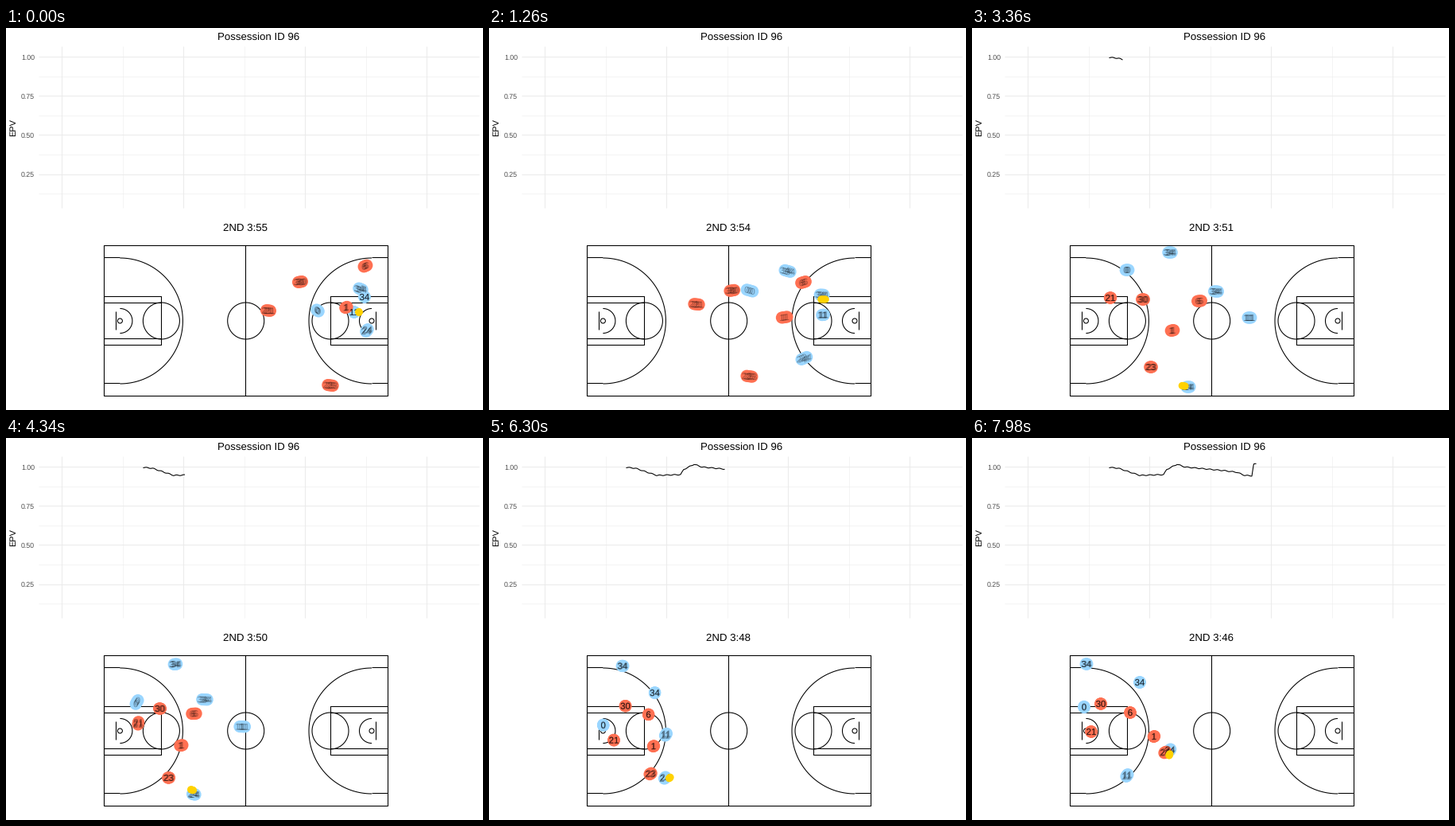
Animation of 600 by 480 pixels, one loop 8 s. Source, as a matplotlib script:

```python
import numpy as np
import matplotlib.pyplot as plt
from matplotlib.animation import FuncAnimation
from matplotlib.collections import LineCollection, PathCollection
from matplotlib.path import Path
from matplotlib.textpath import TextPath
from matplotlib.transforms import Affine2D

plt.rcParams["font.family"] = "Liberation Sans"
plt.rcParams["text.hinting"] = "none"

LOOP, TICK, STEP = 8000, 20, 140      # ms
PT = 0.72                             # points per pixel at 100 dpi
TRAIL = np.array([-1.5, -0.5, 0.5, 1.5]) / 4
BLUE, RED, GOLD = "#9ad6ff", "#ff7052", "#ffd200"

# Number, opening pace, then places at the four key steps:
# rebound, fast break, set up, end
KEYS = np.array([0, 24, 39, 57])
OFFENSE = [
    ("34", 0.7, (446, 328), (249, 282), (183, 287), (144, 284)),
    ("34", 0.0, (451, 338), (307, 331), (208, 325), (211, 307)),
    ("0", 0.4, (392, 355), (195, 304), (146, 366), (141, 338)),
    ("11", 0.0, (438, 357), (349, 364), (241, 361), (195, 424)),
    ("24", 0.4, (454, 380), (272, 451), (215, 439), (249, 392)),
]
DEFENSE = [
    ("1", 0.4, (428, 351), (252, 380), (202, 390), (229, 375)),
    ("6", 0.7, (452, 299), (286, 343), (202, 348), (199, 345)),
    ("21", 1.0, (330, 355), (174, 339), (161, 382), (150, 369)),
    ("30", 1.0, (370, 319), (215, 341), (178, 338), (162, 334)),
    ("23", 1.1, (408, 449), (225, 426), (194, 428), (243, 395)),
]
PLAYERS = OFFENSE + DEFENSE

EPV = np.array([(173, 37), (184, 38), (211, 47), (241, 46), (245, 39.5),
                (258, 33), (268, 36.5), (317, 41), (333, 43), (343, 47),
                (352, 47.5), (354.3, 33), (358, 32.5)])


def smooth(t, start, end):
    s = np.clip((t - start) / (end - start), 0, 1)
    return s * s * (3 - 2 * s)


def track(pace, pts, t):
    """Hermite path that slows where the direction turns."""
    p, h = np.array(pts, float), np.diff(KEYS)[:, None]
    d = np.diff(p, axis=0) / h
    a, b = d[:-1], d[1:]
    mid = np.where(a * b > 0, 2 * a * b / np.where(a * b > 0, a + b, 1), 0)
    v = np.vstack([d[:1] * (pace, 1.2), mid, d[-1:]])
    i = np.clip(np.searchsorted(KEYS, t, "right") - 1, 0, len(KEYS) - 2)
    w, s = h[i], ((t - KEYS[i]) / h[i, 0])[..., None]
    return ((1 + 2 * s) * (1 - s) ** 2 * p[i] + s * (1 - s) ** 2 * w * v[i]
            + s * s * (3 - 2 * s) * p[i + 1] + s * s * (s - 1) * w * v[i + 1])


def carry(t, first, second, third):
    """The ball circles its holder and is passed on twice."""
    one, two = (smooth(t, *span)[..., None] for span in ((2, 8), (11, 14)))
    holder = first + (second - first) * one
    holder = holder + (third - holder) * two
    turn = np.radians(8 * t)
    return holder + 6 * np.stack([np.cos(turn), np.sin(turn)], axis=-1)


def arc(x, y, r, a0=0, a1=360):
    a = np.radians(np.linspace(a0, a1, 121))
    return np.column_stack([x + r * np.cos(a), y + r * np.sin(a)])


def box(x0, y0, x1, y1):
    return [(x0, y0), (x1, y0), (x1, y1), (x0, y1), (x0, y0)]


def number(s):
    path = TextPath((0, 0), s, size=11.4, prop={"family": "Liberation Sans"})
    b = path.get_extents()
    return path.transformed(
        Affine2D().translate(-(b.x0 + b.x1) / 2, -(b.y0 + b.y1) / 2))


fig = plt.figure(figsize=(6, 4.8), dpi=100, facecolor="white")
ax = fig.add_axes([0, 0, 1, 1])
ax.set(xlim=(0, 600), ylim=(480, 0))
ax.axis("off")


def lines(segs, color, width, z):
    ax.add_collection(LineCollection(segs, colors=color, linewidths=width * PT,
                                     zorder=z, capstyle="butt"), autolim=False)


def label(x, y, s, size, color="black", **kw):
    kw = {"ha": "center", "va": "baseline", **kw}
    return ax.text(x, y, s, fontsize=size * PT, color=color, **kw)


def marks(paths, color, z, alpha=None):
    c = PathCollection(paths, offsets=np.zeros((len(paths), 2)),
                       offset_transform=ax.transData, facecolors=color,
                       edgecolors="none", linewidths=0, alpha=alpha, zorder=z)
    c.set_transform(Affine2D())
    ax.add_collection(c, autolim=False)
    return c


# Chart panel
def grid(xs, ys, width):
    lines([[(x, 23), (x, 226)] for x in xs]
          + [[(41, y), (595, y)] for y in ys], "#ebebeb", width, 1)


n = np.arange(4)
cols, rows = 70.3 + 152.9 * n, 36.2 + 49.1 * n
grid(cols[:3] + 76.4, rows + 24.5, 0.55)
grid(cols, rows, 1.07)
for y, value in zip(rows, 1 - n / 4):
    label(36, y + 0.4, f"{value:.2f}", 8.8, "#4d4d4d", ha="right",
          va="center_baseline")
label(9.5, 125, "EPV", 11, rotation=90, va="center")
label(317.6, 15, "Possession ID 96", 13.2)
clock = label(300.8, 255, "", 13.2)
curve, = ax.plot([], [], color="black", lw=1.07 * PT, zorder=2)

# Court, mirrored about the half-way line
hoop = 143.4, 368
half = [
    box(123, 337, 195, 398),
    [(123, 345), (195, 345)],
    [(123, 390), (195, 390)],
    [(138, 356), (138, 379)],
    [(123, 288), (143, 288)],
    [(123, 446), (143, 446)],
    arc(*hoop, 79, -90, 90),
    arc(*hoop, 15.5, -90, 90),
    arc(*hoop, 3),
    arc(195.4, 368, 23),
]
flip = [[(603.4 - x, y) for x, y in seg] for seg in half]
lines(half + flip + [box(123, 273, 480, 462), [(301, 273), (301, 462)],
                     arc(301.7, 368, 23)], "black", 1.07, 3)

# Players and ball, each drawn once per trail sample
copies = len(TRAIL)
colors = [BLUE] * (copies * len(OFFENSE)) + [RED] * (copies * len(DEFENSE))
glyphs = [g for s, *_ in PLAYERS for g in [number(s)] * copies]
dots = marks([Path.circle((0, 0), 7.6)] * len(colors), colors, 4)
digits = marks(glyphs, "black", 5, 0.33)
ball = marks([Path.circle((0, 0), 4.6)] * copies, GOLD, 6)

times = np.arange(-(-LOOP // STEP))[:, None] + TRAIL
paths = [track(pace, pts, times) for _, pace, *pts in PLAYERS]
crowd = np.concatenate(paths, axis=1)
ball_xy = carry(times, paths[3], paths[1], paths[4])


def update(i):
    k = i * TICK // STEP
    dots.set_offsets(crowd[k])
    digits.set_offsets(crowd[k])
    ball.set_offsets(ball_xy[k])
    clock.set_text(f"2ND 3:{int(55.5 - 0.16 * k)}")
    x = np.arange(EPV[0, 0], 66.5 + 5.105 * k, 0.5)
    curve.set_data(x, np.interp(x, *EPV.T) + 0.5 * np.sin(x / 1.5))
    return dots, digits, ball, clock, curve


anim = FuncAnimation(fig, update, frames=LOOP // TICK, interval=TICK,
                     repeat=True, repeat_delay=0, cache_frame_data=False)
plt.show()
```
